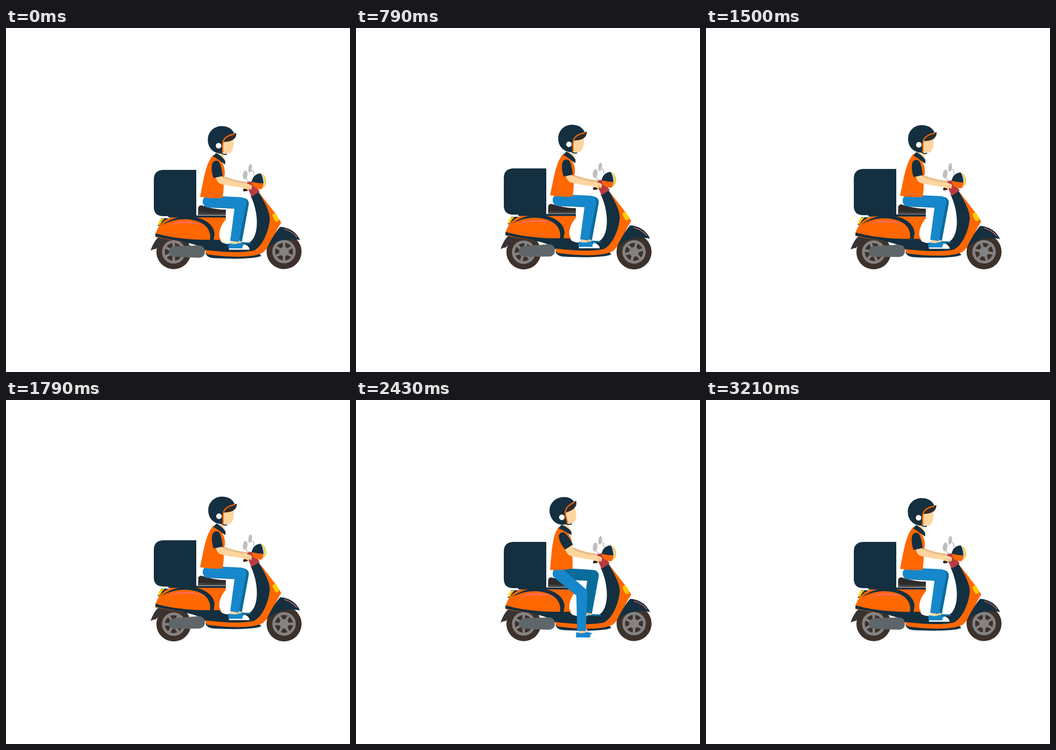
Animation, 640 px wide and 640 px high, one loop 3280 ms. Source, as an HTML page:

```html
<!DOCTYPE html>
<html lang="en">
<head>
<meta charset="utf-8">
<title>Scooter courier</title>
<style>
  html, body { margin: 0; width: 100%; height: 100%; overflow: hidden; background: #fff; }
  svg { display: block; width: 100vw; height: 100vh; }
  .navy { fill: #142f40; }
  .orange { fill: #ff6700; }
  .blue { fill: #1787cb; }
  .deep { fill: #0a6c9b; }
  .skin { fill: #ffd59f; }
  .shade { fill: #e9bf8a; }
  .grey { fill: #bfbfbf; }
  .dark { fill: #2e2b2b; }
  .line { fill: none; stroke-linecap: round; }
</style>
</head>
<body>
<svg viewBox="0 0 640 640" xmlns="http://www.w3.org/2000/svg">
  <defs>
    <g id="rim">
      <circle r="19.2" fill="none" stroke="#858283" stroke-width="5.2"/>
      <circle r="9" fill="#858283"/>
      <path d="M0-18V18M-15.6-9L15.6 9M-15.6 9L15.6-9" stroke="#858283" stroke-width="4.6"/>
    </g>
  </defs>

  <g id="wheels">
    <circle cx="312" cy="416.5" r="32.2" fill="#3d322b"/>
    <circle cx="517.3" cy="416" r="32.6" fill="#3d322b"/>
    <use href="#rim" class="rim" data-x="312" data-y="416.5"/>
    <use href="#rim" class="rim" data-x="517.3" data-y="416"/>
  </g>

  <g id="ride">
    <!-- scooter -->
    <path fill="#353537" d="M269 414C273 402 278 394 284 389L300 391C292 396 285 404 279 411Q275 411 269 414Z"/>
    <path class="navy" d="M289 354H302L292 368H282Z"/>
    <path fill="#ffcc00" d="M288 355L295 354Q289 360 286 367L283 366Q284 360 288 355Z"/>
    <path class="orange" d="M278 384C281 371 291 357 308 352H409V356C401 365 396 376 397 388L401 398H330L278 389Z"/>
    <path class="navy" d="M290 367C305 354 325 350 343 351C371 353 387 367 388 383L386 396H379C384 376 370 361 346 357C323 353 302 360 290 367Z"/>
    <path fill="#ff6a5f" d="M301 368C320 357 350 357 371 368C350 362 322 361 301 368Z"/>
    <path class="navy" d="M278 382C310 391 345 395 397 394Q402 402 415 402H446C472 397 472 346 455 312L470 305C483 325 492 343 491 357C488 384 477 410 465 416C438 419 400 418 370 414C358 400 322 397 278 388Z"/>
    <path class="navy" d="M371 418H470L475 424C462 430 418 430 385 428Q373 427 371 418Z"/>
    <path class="orange" d="M470 305C486 326 504 347 512 362C499 381 495 402 479 417C464 428 412 427 374 421L370 413C402 417 440 419 461 414C478 406 489 376 491 357C491 341 480 322 470 305Z"/>
    <path class="navy" d="M510 370C530 371 542 383 547 394.5C525 390 503 393 485 411C493 393 502 379 510 370Z"/>
    <path class="line" stroke="#ff6a5f" stroke-width="1.3" d="M518 374Q533 379 541 389"/>
    <rect x="498" y="345" width="8" height="16" rx="3.5" fill="#ffcc00" transform="rotate(-27 502 353)"/>
    <path class="navy" d="M354 264V350H291Q275 349 275 333V282Q275 265 292 264Z"/>
    <path class="navy" d="M302 348.7H409V352.5H302Z"/>
    <path class="dark" d="M357.5 348V335Q358 330 364 330Q387 338 409 338V348Z"/>
    <path fill="#454344" d="M357.5 348V343Q383 346 409 344V348Z"/>

    <g class="line" stroke="#bfbfbf" stroke-width="1.7">
      <path d="M447 280Q447 284 453 286L456 291M456 265Q462 264 461 274"/>
    </g>
    <ellipse class="grey" cx="445" cy="273.5" rx="4.4" ry="8.3" transform="rotate(8 445 273)"/>
    <ellipse class="grey" cx="454.3" cy="261" rx="3.4" ry="8" transform="rotate(8 454 261)"/>
    <path fill="#b83b42" d="M445 288L458 285L472 304L457 314Z"/>
    <path fill="#ffcc00" d="M476 271Q484 276 484 286T475 299Z"/>
    <path fill="#d3d5d6" d="M473 271Q482 274 482 286T473 300Z"/>
    <path class="orange" d="M457 286Q466 288 479 289Q479 296 475 300Q459 300 457 286Z"/>
    <path class="navy" d="M457 286Q460 271 474 270.5Q478 277 479 289Q467 289 457 286Z"/>

    <!-- rider -->
    <path class="deep" d="M431 398L452 399Q456 400 456 402H430Z"/>
    <path class="shade" d="M429 394H438V400H429Z"/>
    <path id="farLeg" class="deep"/>
    <g id="foot">
      <path class="skin" d="M418 394H433L437 399L434 403H418Z"/>
      <path fill="#fff" d="M414 406L440 402Q452 403 453.5 412.5H415Z"/>
      <path class="blue" d="M415 400Q424 404 434 400L444 402Q439 405 440 410H414Q413 404 415 400Z"/>
      <path class="line" id="sole" stroke="#dfe6ea" stroke-width=".7" d="M415 413.2H453"/>
    </g>
    <path id="nearLeg" class="blue"/>
    <path id="farArm" class="shade"/>
    <g id="torso">
      <path class="skin" d="M394 228H404V236L408 247L394 241Z"/>
      <path class="orange" d="M386 236C371 250 367 287 361 314Q381 318 403 316C405 302 406 291 403 281L407 273C408 258 402 244 386 236Z"/>
      <path class="navy" d="M385 239L391 232.5C399 237 405 242 408 248L407.5 254C400 249 394 243 385 239Z"/>
      <g id="head">
        <path class="skin" d="M402 203L423 205Q425 231 413 234Q404 235 402 229Z"/>
        <path class="navy" d="M425 197C421 187 412 182.5 401 182.5C387 182.5 375.5 193 375.5 208C375.5 224 387 234 402 233.5C404 214 402 203 425 197Z"/>
        <path class="line" stroke="#142f40" stroke-width="2" d="M400 232Q405 236.5 410 235"/>
        <path class="dark" d="M404 212C405 203 416 198 428.5 195.5C429 207 419 212 404 212Z"/>
        <path class="line" stroke="#ff6700" stroke-width="2.3" d="M403.5 231C402 214 401 202 424 197.5"/>
        <circle cx="395.5" cy="219" r="5.2" fill="#fff"/>
      </g>
    </g>
    <path id="nearArm" class="skin"/>
    <g id="sleeve">
      <path class="navy" d="M383 256C384 247 391 245 396 249C401 257 402 267 403 275.5L386 279C383 270 382 263 383 256Z"/>
    </g>
    <path class="line" stroke="#33241f" stroke-width="5" d="M443.5 301.5L450 300"/>
    <path class="skin" d="M440 289Q453 289 458 294L456 301L453 299L451 303L448 300L441 298Z"/>
    <path class="line" stroke="#d8a873" stroke-width=".8" d="M449 296L452 301M452 294L455 299"/>
  </g>

  <g id="exhaust">
    <path fill="#5f6669" d="M312 406L358 404.5Q370 405 370 416T358 427.5L312 425.5Q303 424 303 416T312 406Z"/>
    <circle cx="342.5" cy="403.5" r="1.3" fill="#fff"/>
  </g>
</svg>
<script>
  const LOOP = 3280, STEP = LOOP / 46;
  const $ = id => document.getElementById(id);
  const rims = document.querySelectorAll('.rim');

  const mix = (a, b, k) => a + (b - a) * k;
  const mixPoint = (a, b, k) => [mix(a[0], b[0], k), mix(a[1], b[1], k)];
  const ramp = (t, from, to) => {
    const x = Math.min(1, Math.max(0, (t - from) / (to - from)));
    return x * x * (3 - 2 * x);
  };
  const bump = (t, from, to) =>
    t <= from || t >= to ? 0 : Math.sin(Math.PI * (t - from) / (to - from)) ** 2;
  const set = (id, transform) => $(id).setAttribute('transform', transform);
  const draw = (id, d) => $(id).setAttribute('d', d);

  const disc = ([x, y], r) =>
    `M${x - r} ${y}a${r} ${r} 0 1 1 ${2 * r} 0a${r} ${r} 0 1 1 ${-2 * r} 0Z`;

  // Tapered segment, wound the same way as disc so overlaps stay filled.
  function bone([ax, ay], [bx, by], ra, rb) {
    const len = Math.hypot(bx - ax, by - ay);
    const nx = (ay - by) / len, ny = (bx - ax) / len;
    return `M${ax - nx * ra} ${ay - ny * ra}L${bx - nx * rb} ${by - ny * rb}` +
           `L${bx + nx * rb} ${by + ny * rb}L${ax + nx * ra} ${ay + ny * ra}Z`;
  }

  const leg = (hip, knee, ankle) =>
    disc(hip, 11) + bone(hip, knee, 11, 10.3) + disc(knee, 10.3) + bone(knee, ankle, 10.3, 8);

  function render(t) {
    const bounce = ramp(t, 230, 400) * (1 - ramp(t, 1700, 2000));
    const bob = bounce * 2 * (Math.cos(2 * Math.PI * (t - 547) / 768) - 1);
    const wheelie = -2.4 * bump(t, 0, 420);
    const dive = 2 * bump(t, 1780, 2300);
    set('ride', `translate(0 ${bob}) rotate(${wheelie} 312 417) rotate(${dive} 510 420)`);
    set('wheels', `translate(0 ${-bob * 0.2})`);
    // The exhaust swings on the rear axle as the body lifts.
    set('exhaust', `rotate(${wheelie + bob - 2.5 * dive} 312 416)`);

    const spin = 720 * ramp(t, 0, 2290);
    rims.forEach(rim => rim.setAttribute('transform',
      `translate(${rim.dataset.x} ${rim.dataset.y}) rotate(${spin})`));

    const settle = ramp(t, 2290, 2430) * (1 - ramp(t, 2960, 3205));
    const k = settle * (1 + 0.03 * bump(t, 2430, 2960));
    const lean = -6 * k - bob * 0.15;
    const hip = [377, 323];
    draw('farLeg', leg(hip, [441.5, 326.5], [431, 396]));
    draw('nearLeg', leg(hip, mixPoint([437, 325], [420, 359], k), mixPoint([425, 397], [419.5, 430], k)));
    set('foot', `translate(${-4.5 * k} ${32 * k})`);
    $('sole').setAttribute('opacity', k);

    set('torso', `rotate(${lean} 380 316)`);
    set('head', `rotate(${-8 * k} 395 236)`);
    set('sleeve', `rotate(${lean} 380 316) rotate(${-15 * k} 391 253)`);
    const elbow = mixPoint([390, 277], [388, 277], k);
    const crook = mixPoint([402, 275], [402, 269], k);
    draw('farArm', `M404 ${mix(275, 274, k)}Q425 284 449 286V293Q420 290 400 283Z`);
    draw('nearArm', `M${elbow}L${crook}Q${mix(404, 402, k)} 279 409 281Q430 288 447 290L449 298Q424 296 399 290Q393 288 ${elbow}Z`);
  }

  function tick() {
    const t = performance.now() % LOOP;
    render(Math.floor(t / STEP + 0.1) % 46 * STEP);
    requestAnimationFrame(tick);
  }
  tick();
</script>
</body>
</html>
```
